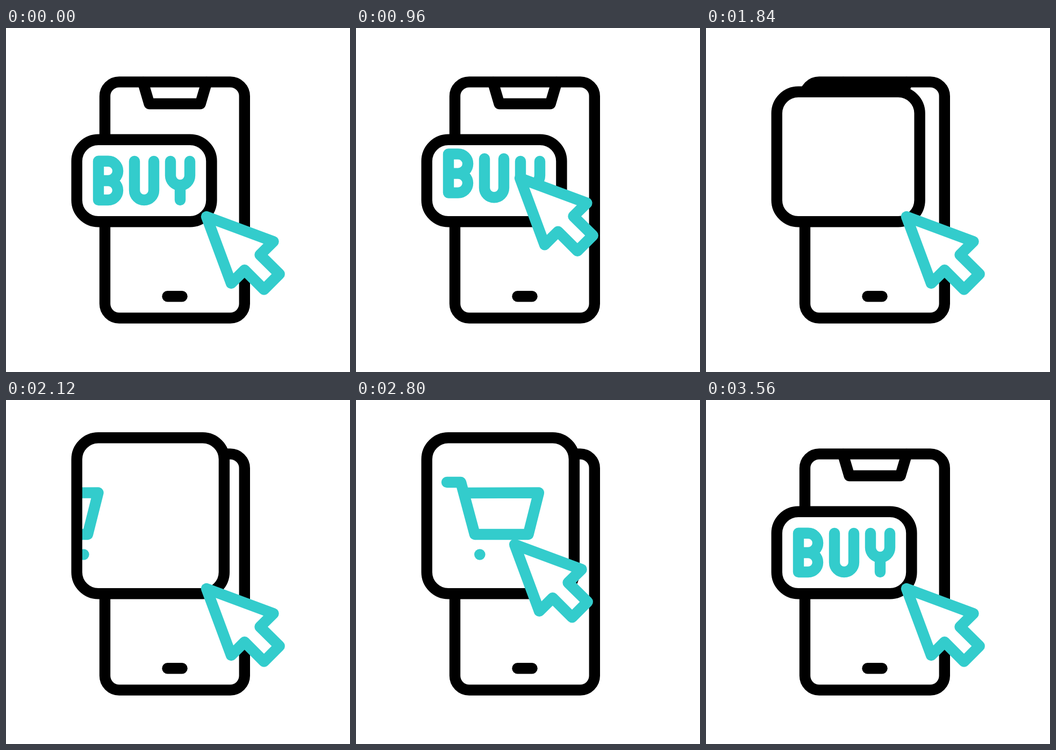
Write an HTML page with a canvas that moves like this. It is 640 px wide and 640 px high and loops after 3600 ms.

```html
<!DOCTYPE html>
<html lang="en">
<head>
<meta charset="utf-8">
<title>Buy button</title>
<style>
  html, body { margin: 0; width: 100%; height: 100%; overflow: hidden; background: #fff; }
  canvas { display: block; width: 640px; height: 640px; }
</style>
</head>
<body>
<canvas id="stage" width="640" height="640"></canvas>
<script>
const ctx = document.getElementById('stage').getContext('2d');
const TEAL = '#33cccc', BLACK = '#000', WHITE = '#fff';
const LOOP = 3600, TICK = 20;

// Shapes in stage coordinates at their resting places
const LETTERS = [
  'M172 247.8H190A18 18 0 0 1 190 284H172M190 284A18 18 0 0 1 190 320H172V247.8',
  'M239 248V302A18 18 0 0 0 275 302V248',
  'M306 248V274.5A18 18 0 0 0 342 274.5V248M324 292.5V320'
].map(d => new Path2D(d));
const CART = new Path2D('M169 153H195L221 250H320.5L340 172.5L201 173');
const CURSOR = new Path2D('M373 351L497.5 397.3L472.5 422L508.7 457.7L480 486.5L443.8 450.3L419 475Z');
const NOTCH = new Path2D('M254.8 101L266.6 141H361.6L373.4 101');
const HOME = new Path2D('M300.5 499.2H327.5');

// Eased progress 0..1 between two ticks
function ease(tick, from, to) {
  const x = Math.min(1, Math.max(0, (tick - from) / (to - from)));
  return x * x * (3 - 2 * x);
}

function line(path, color) {
  ctx.strokeStyle = color;
  ctx.stroke(path);
}

function shifted(x, y, draw) {
  ctx.save();
  ctx.translate(x, y);
  draw();
  ctx.restore();
}

function box(left, top, right, bottom, radius) {
  const path = new Path2D();
  path.roundRect(left, top, right - left, bottom - top, radius);
  return path;
}

function filledLine(path, color) {
  ctx.fillStyle = WHITE;
  ctx.fill(path);
  line(path, color);
}

function drawPhone() {
  filledLine(box(184, 100.4, 443.8, 539.6, 26.5), BLACK);
  line(NOTCH, BLACK);
  line(HOME, BLACK);
}

// Each letter hops up, drops out of the panel, and later rises back
function letterY(tick, i) {
  const start = 37.5 + 5 * i;
  const back = 153 + 3 * i;
  const hop = -21.5 * ease(tick, start, start + 18);
  const drop = 136 * ease(tick, start + 18, start + 46);
  const rise = 114.5 * ease(tick, back, back + 16);
  return hop + drop - rise;
}

function drawCart(tick) {
  const x = -215 * (1 - ease(tick, 100, 120)) + 240 * ease(tick, 148.5, 168.5);
  shifted(x, 0, () => {
    line(CART, TEAL);
    ctx.fillStyle = TEAL;
    for (const wheel of [230.3, 313]) {
      ctx.beginPath();
      ctx.arc(wheel, 287.5, 10.3, 0, 2 * Math.PI);
      ctx.fill();
    }
  });
}

function drawPanel(tick) {
  const open = ease(tick, 80, 100) - ease(tick, 162, 173);
  const panel = box(131.7, 207.8 - 137.5 * open, 382.4 + 23.5 * open, 360.3, 40);
  ctx.fillStyle = WHITE;
  ctx.fill(panel);
  ctx.save();
  ctx.clip(panel);
  LETTERS.forEach((letter, i) => shifted(0, letterY(tick, i), () => line(letter, TEAL)));
  drawCart(tick);
  ctx.restore();
  line(panel, BLACK);
}

function drawCursor(tick) {
  const away = ease(tick, 6, 36) - ease(tick, 43.7, 62.9)
             + ease(tick, 110.5, 140.5) - ease(tick, 158.6, 177);
  shifted(-78 * away, -82.2 * away, () => filledLine(CURSOR, TEAL));
}

function render(time) {
  const tick = Math.floor((time % LOOP) / TICK);
  ctx.fillStyle = WHITE;
  ctx.fillRect(0, 0, 640, 640);
  ctx.lineWidth = 20.4;
  ctx.lineCap = ctx.lineJoin = 'round';
  drawPhone();
  drawPanel(tick);
  drawCursor(tick);
}

const start = performance.now();
function loop() {
  render(Math.max(0, performance.now() - start));
  requestAnimationFrame(loop);
}
loop();
</script>
</body>
</html>
```
